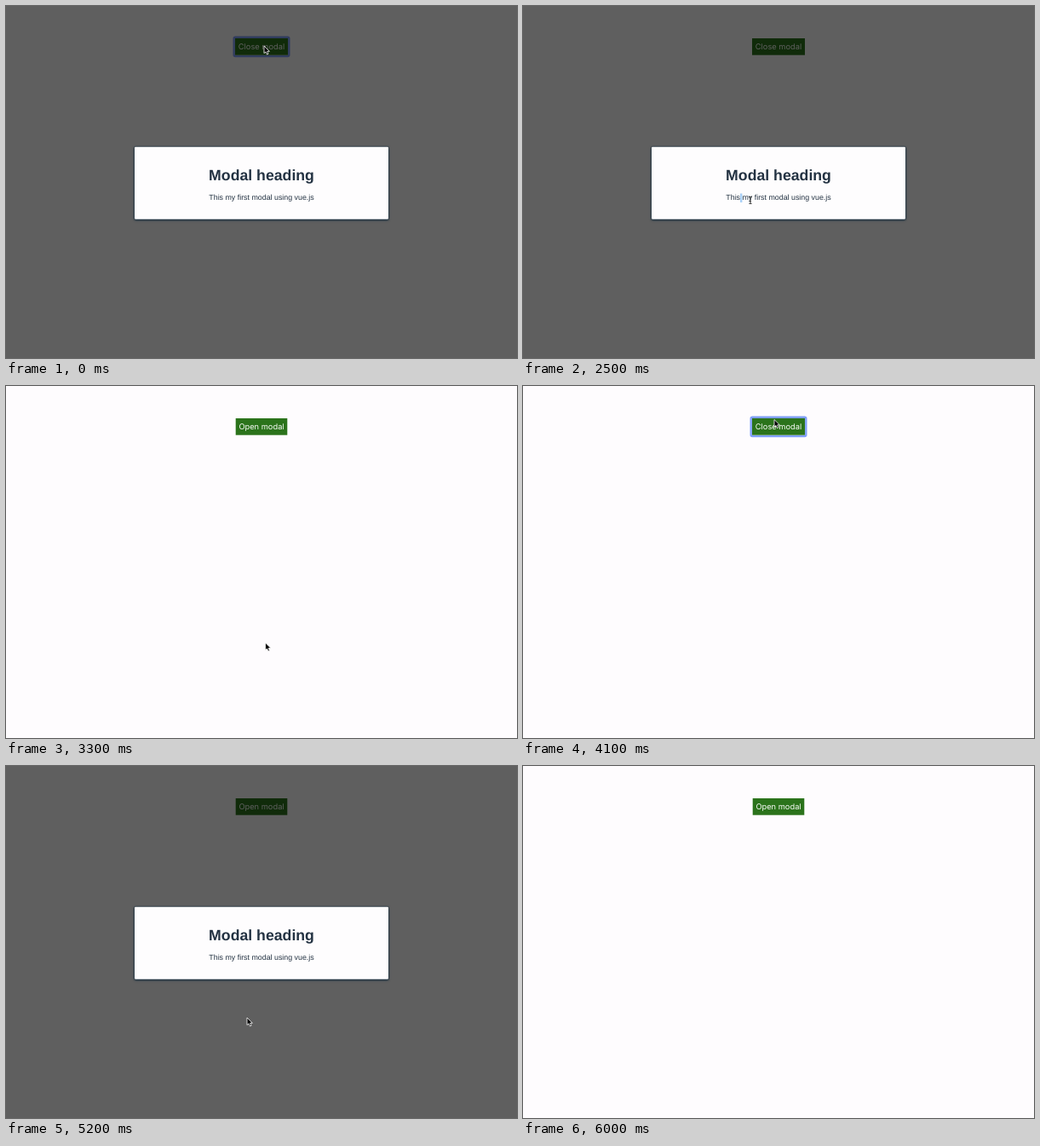
These frames come from a looping animation (600x414 px, 6300 ms). An HTML page:

```html
<!DOCTYPE html>
<html lang="en">
<head>
<meta charset="utf-8">
<title>Modal demo</title>
<style>
  html, body { margin: 0; width: 100%; height: 100%; overflow: hidden; background: #fefcfe; }
  svg { display: block; width: 600px; height: 414px; }
  text { text-anchor: middle; text-rendering: geometricPrecision; }
  #button { fill: #2b731b; }
  #label { font: 9.3px Inter, sans-serif; fill: #fbfdfa; }
  #ring { fill: none; stroke: #7f9ffa; stroke-width: 2.4px; }
  #overlay { opacity: .624; }
  #modal { transform-origin: 300px 208.3px; font-family: "Liberation Sans", Arial, sans-serif; fill: #233242; }
  #panel { fill: #fefdfe; filter: drop-shadow(0 .5px 1px #1b3040) drop-shadow(0 1px 1.2px #1b3040); }
  #selection { fill: #a9d0f7; }
  .heading { font-size: 17.7px; font-weight: bold; }
  .copy { font-size: 8.85px; }
  #arrow { stroke: #fff; stroke-width: .8px; }
  #beam { fill: none; stroke: #222; stroke-width: .8px; }
</style>
</head>
<body>
<svg viewBox="0 0 600 414">
  <rect id="button" y="38" height="19.7"/>
  <rect id="ring" x="267.7" y="36.7" width="64.6" height="22.4" rx="1.5"/>
  <text id="label" x="300" y="51.3"></text>
  <g id="dialog">
    <rect id="overlay" width="600" height="414"/>
    <g id="modal">
      <rect id="panel" x="151" y="165.8" width="298" height="85" rx="1.2"/>
      <rect id="selection" x="255" y="220.5" width="2.4" height="10.5"/>
      <text class="heading" x="300" y="205.4">Modal heading</text>
      <text class="copy" x="300" y="228.3">This my first modal using vue.js</text>
    </g>
  </g>
  <g id="pointer">
    <path id="arrow" d="M0 0V8.6L2 6.9L3.4 10L5 9.3L3.7 6.3H6.4Z"/>
    <path id="beam" d="M-1.6-3.5H1.6M0-3.5V4.5M-1.6 4.5H1.6M-1 2H1"/>
  </g>
</svg>
<script>
const LOOP = 6300, STEP = 100;
const [button, ring, label, dialog, modal, selection, pointer, arrow, beam] =
  ["button", "ring", "label", "dialog", "modal", "selection", "pointer", "arrow", "beam"]
    .map(id => document.getElementById(id));

// Each move eases to (x, y) and swings out by a bow on the way
const move = (from, to, x, y, bowX = 0, bowY = 0) => ({ from, to, x, y, bowX, bowY });
const start = { x: 303, y: 47 };
const moves = [
  move(0, 600, 279, 251, 25),
  move(700, 1000, 278, 264, 45, -70),
  move(1400, 1800, 238, 225, 0, -42),
  move(1900, 2500, 267, 228, 155),
  move(2600, 3100, 304.5, 302, 62),
  move(3400, 4100, 295, 39.5),
  move(4400, 4800, 352, 190),
  move(4900, 5200, 283, 296),
  move(5600, 5700, 402, 61)
];

const within = (v, from, to) => v >= from && v < to;
const show = (el, on) => el.setAttribute("visibility", on ? "visible" : "hidden");
const ease = k => k * k * (3 - 2 * k);

function pointAt(t) {
  let { x, y } = start;
  for (const m of moves) {
    if (t < m.from) break;
    const k = ease(Math.min(1, (t - m.from) / (m.to - m.from)));
    const swing = Math.sin(Math.PI * k);
    x += (m.x - x) * k + m.bowX * swing;
    y += (m.y - y) * k + m.bowY * swing;
  }
  return [x, y];
}

function drawButton(t) {
  const closes = t < 3100 || within(t, 4100, 5200);
  const width = closes ? 62 : 60.6;
  button.setAttribute("x", 300 - width / 2);
  button.setAttribute("width", width);
  label.textContent = closes ? "Close modal" : "Open modal";
  show(ring, t < 2000 || within(t, 4100, 5200));
}

function drawDialog(t, open) {
  const entered = t < 4200 ? 1 : Math.min(1, (t - 4200) / 300);
  dialog.style.display = open ? "" : "none";
  modal.style.transform = `scale(${1.094 - .094 * entered})`;
  show(selection, within(t, 2400, 3100));
}

function drawPointer(t, open) {
  const [x, y] = pointAt(t);
  const onText = open && within(x, 234, 366) && (within(y, 190, 210) || within(y, 219, 233));
  const visible = t < 5800;
  pointer.setAttribute("transform", `translate(${x} ${y})`);
  show(arrow, visible && !onText);
  show(beam, visible && onText);
}

function tick() {
  const t = Math.floor(performance.now() % LOOP / STEP) * STEP;
  const open = t < 3300 || within(t, 4200, 5400);
  drawButton(t);
  drawDialog(t, open);
  drawPointer(t, open);
  requestAnimationFrame(tick);
}
tick();
</script>
</body>
</html>
```
